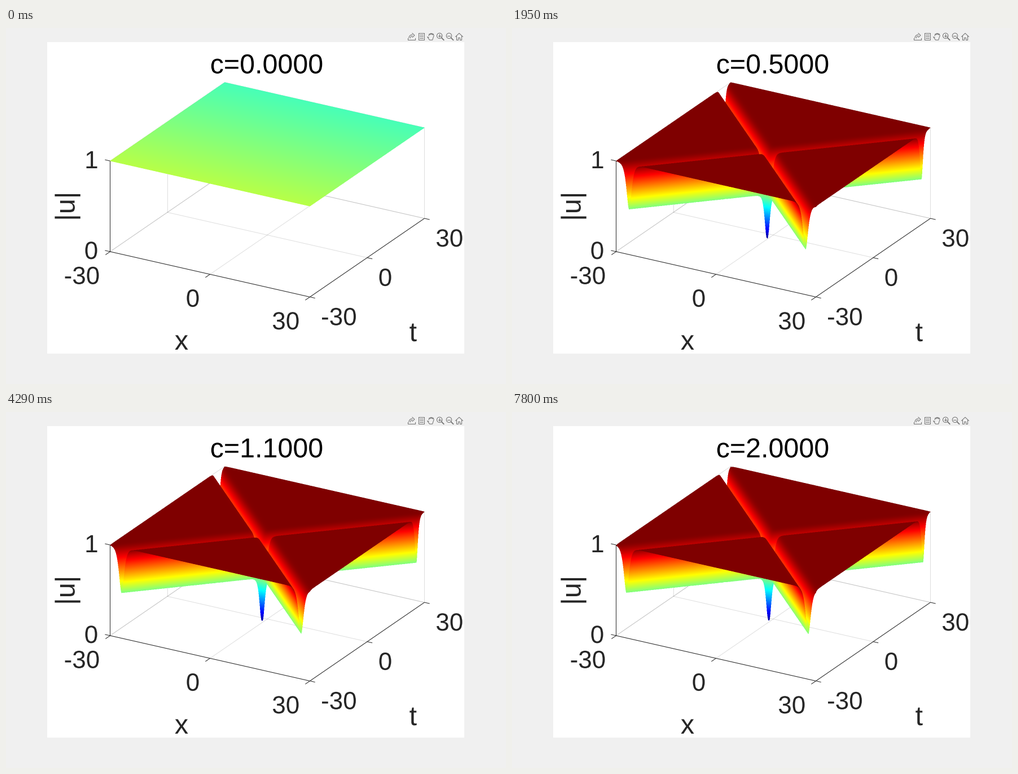
Write a matplotlib script that moves like this. It is 886 px wide and 632 px high and loops after 8 s.

```python
import numpy as np
import matplotlib.pyplot as plt
from matplotlib.animation import FuncAnimation
from matplotlib.patches import Circle, PathPatch, Rectangle
from matplotlib.textpath import TextPath
from matplotlib.transforms import Affine2D

W, H, DPI = 886, 632, 100
LOOP, TICK, HOLD, STEPS = 8000, 40, 390, 21
PX = 72 / DPI
INK, ICON = "#262626", "#707070"
TICK_SIZE = 44
NAME_SIZE = 1.1 * TICK_SIZE

plt.rcParams["font.family"] = "Liberation Sans"
plt.rcParams["image.interpolation"] = "nearest"

# Orthographic view: screen position of the box corner and its three edges
ORIGIN = np.array([184.5, 397.0])
EDGE_X = np.array([354.0, 80.5])
EDGE_T = np.array([203.0, -139.5])
EDGE_Z = np.array([0.0, -161.0])


def project(x, t, z=0.0):
    """Screen point for x, t in -30..30 and z in 0..1."""
    return ORIGIN + EDGE_X * (x + 30) / 60 + EDGE_T * (t + 30) / 60 + EDGE_Z * z


# ---- Surface -------------------------------------------------------------
LEFT, TOP, WIDE, HIGH = 184, 94, 559, 308
SS = 2          # supersampling
SAMPLES = 700   # points per screen column, ordered back to front
K = np.sqrt(3)
X0 = np.log(2) / K

# Each screen column is one slice through the surface
col = LEFT + (np.arange(WIDE * SS) + 0.5) / SS - ORIGIN[0]
inside = (col >= 0) & (col <= EDGE_X[0] + EDGE_T[0])
col_id, col = np.flatnonzero(inside), col[inside]
far = np.clip(col / EDGE_T[0], 0, 1)
near = np.clip((col - EDGE_X[0]) / EDGE_T[0], 0, 1)
T = np.linspace(far, near, SAMPLES, axis=1)
X = (col[:, None] - EDGE_T[0] * T) / EDGE_X[0]
FLOOR = ORIGIN[1] + EDGE_X[1] * X + EDGE_T[1] * T
COSH_X = np.cosh(K * (60 * X - 30 - X0))


def two_solitons(c):
    """Modulus of two colliding dark solitons; c shifts the collision in t."""
    s = K * (60 * T - 30 + 3.48) - np.log(c)
    ch, sh = np.cosh(s), np.sinh(s)
    return np.sqrt((COSH_X - ch) ** 2 + 3 * sh ** 2) / (COSH_X + 2 * ch)


def jet(v):
    peaks = np.array([3, 2, 1])
    return np.clip(1.5 - np.abs(4 * v[..., None] - peaks), 0, 1)


def render(c):
    """RGBA picture of the surface, nearer samples painted over farther ones."""
    if c == 0:
        z, shade = np.ones_like(T), 0.555 - 0.11 * T
    else:
        z = shade = two_solitons(c)
    row = (FLOOR + EDGE_Z[1] * z - TOP) * SS
    start, step = row[:, :-1].ravel(), np.diff(row, axis=1).ravel()
    value, dv = shade[:, :-1].ravel(), np.diff(shade, axis=1).ravel()
    n = np.ceil(np.abs(step)).astype(int) + 1
    seg = np.repeat(np.arange(n.size), n)
    frac = (np.arange(seg.size) - np.repeat(np.cumsum(n) - n, n)) / n[seg]
    rows = np.clip((start[seg] + frac * step[seg]).astype(int), 0, HIGH * SS - 1)
    cols = np.repeat(col_id, SAMPLES - 1)[seg]
    buf = np.full((HIGH * SS, WIDE * SS), -1.0)
    buf[rows, cols] = value[seg] + frac * dv[seg]

    mask = (buf >= 0).astype(float)
    blocks = (HIGH, SS, WIDE, SS)
    rgb = (jet(buf) * mask[..., None]).reshape(blocks + (3,)).sum(axis=(1, 3))
    cover = mask.reshape(blocks).sum(axis=(1, 3))
    rgb /= np.maximum(cover, 1)[..., None]
    return np.clip(np.dstack([rgb, cover / SS ** 2]), 0, 1)


# ---- Stage ---------------------------------------------------------------
fig = plt.figure(figsize=(W / DPI, H / DPI), dpi=DPI, facecolor="#f0f0f0")
ax = fig.add_axes([0, 0, 1, 1])
ax.set_xlim(0, W)
ax.set_ylim(H, 0)
ax.axis("off")
ax.add_patch(Rectangle((73, 25), 739, 553, fc="white", ec="none", zorder=0))


def line(*points, color=INK, width=1.0, **kw):
    xs, ys = zip(*points)
    ax.plot(xs, ys, color=color, lw=width * PX, solid_capstyle="butt", **kw)


def glyphs(text, size, anchor=0.5, turn=0, at=(0, 0)):
    """Outline of text on its baseline; anchor 0 is its left, 1 its right."""
    path = TextPath((0, 0), text, size=size)
    box = path.get_extents()
    move = Affine2D().translate(-box.x0 - anchor * box.width, 0)
    return move.rotate_deg(turn).scale(1, -1).translate(*at).transform_path(path)


def label(text, at, size=TICK_SIZE, color=INK, **kw):
    return ax.add_patch(PathPatch(glyphs(text, size, at=at, **kw),
                                  fc=color, lw=0, zorder=4))


def draw_box():
    grid = dict(alpha=0.15, zorder=1)
    for v in (-30, 0, 30):
        line(project(v, -30), project(v, 30), **grid)
        line(project(-30, v), project(30, v), **grid)
        line(project(-30, v), project(-30, v, 1), **grid)
        line(project(v, 30), project(v, 30, 1), **grid)
    for z in (0, 1):
        line(project(-30, -30, z), project(-30, 30, z), project(30, 30, z), **grid)
    line(project(-30, -30, 1), project(-30, -30), project(30, -30),
         project(30, 30), zorder=2)


def draw_ticks():
    along_x = 9.4 * EDGE_X / np.hypot(*EDGE_X)
    along_t = 9.9 * EDGE_T / np.hypot(*EDGE_T)
    for v in (-30, 0, 30):
        a, b = project(v, -30), project(30, v)
        line(a, a - along_t, zorder=2)
        line(b, b + along_x, zorder=2)
        label(str(v), a + (-20, 57.5), anchor=1)
        label(str(v), b + (21.5, 50), anchor=0)
    for z in (0, 1):
        a = project(-30, -30, z)
        line(a, a - along_x, zorder=2)
        label(str(z), a + (-23, 13), anchor=1)


# ---- Toolbar: each icon is drawn around its own centre --------------------
def stroke(cx, xs, ys, width=1.0):
    ax.plot(cx + np.asarray(xs), 15.3 + np.asarray(ys), color=ICON,
            lw=width * PX, zorder=4)


def export_icon(cx):
    stroke(cx, [-6.5, -6.5, 6.5, 6.5], [3, 5.5, 5.5, 3])
    u = np.linspace(0, np.pi / 2, 12)
    for r in (6, 3.5):
        stroke(cx, 1 - r * np.cos(u), 2.5 - r * np.sin(u))
    stroke(cx, [1, 5, 1], [-6, -2.3, 1.4])


def data_tip_icon(cx):
    stroke(cx, [-5, 5, 5, -5, -5], [-6, -6, 6, 6, -6])
    for y in (-3, 0, 3):
        stroke(cx, [-2.5, 3], [y, y])


def hand_icon(cx):
    u = np.linspace(0, 1, 60)
    tops = -1.5 - 2.5 * np.abs(np.sin(4 * np.pi * u)) - 2 * np.sin(np.pi * u)
    stroke(cx, np.r_[-3.5 + 9 * u, 3, -2, -6, -3.5],
           np.r_[tops, 6, 6, 0.5, 1.5])


def zoom_icon(cx, plus):
    ax.add_patch(Circle((cx - 1.2, 13.8), 4.7, fill=False, ec=ICON,
                        lw=PX, zorder=4))
    stroke(cx, [2.2, 6.3], [1.9, 6], 1.7)
    stroke(cx, [-3.7, 1.3], [-1.5, -1.5])
    if plus:
        stroke(cx, [-1.2, -1.2], [-4, 1])


def home_icon(cx):
    stroke(cx, [-6.5, 0, 6.5], [0.2, -6, 0.2])
    for side in (-1, 1):
        stroke(cx, side * np.array([4.5, 4.5, 1.5, 1.5, 0]), [-1, 6, 6, 2, 2])


def draw_toolbar():
    icons = (export_icon, data_tip_icon, hand_icon,
             lambda cx: zoom_icon(cx, True), lambda cx: zoom_icon(cx, False),
             home_icon)
    for i, icon in enumerate(icons):
        icon(719 + 16.8 * i)


def title_path(c):
    return glyphs(f"c={c:.4f}", NAME_SIZE, at=(462, 80.5))


draw_box()
draw_ticks()
draw_toolbar()
label("x", (311, 571), NAME_SIZE)
label("t", (721.5, 556), NAME_SIZE)
label("|u|", (121.5, 316.7), NAME_SIZE, turn=90)
title = ax.add_patch(PathPatch(title_path(0), fc="black", lw=0, zorder=4))
surface = fig.figimage(np.zeros((HIGH, WIDE, 4)), xo=LEFT, yo=H - TOP - HIGH,
                       origin="upper", zorder=5)
ax.set_xlim(0, W)
ax.set_ylim(H, 0)

pictures = {}


def update(i):
    step = min((i * TICK + TICK - 1) // HOLD, STEPS - 1)
    c = step / 10
    if step not in pictures:
        pictures[step] = render(c)
    surface.set_data(pictures[step])
    title.set_path(title_path(c))
    return surface, title


anim = FuncAnimation(fig, update, frames=LOOP // TICK, interval=TICK,
                     repeat=True, repeat_delay=0, blit=False)
plt.show()
```
